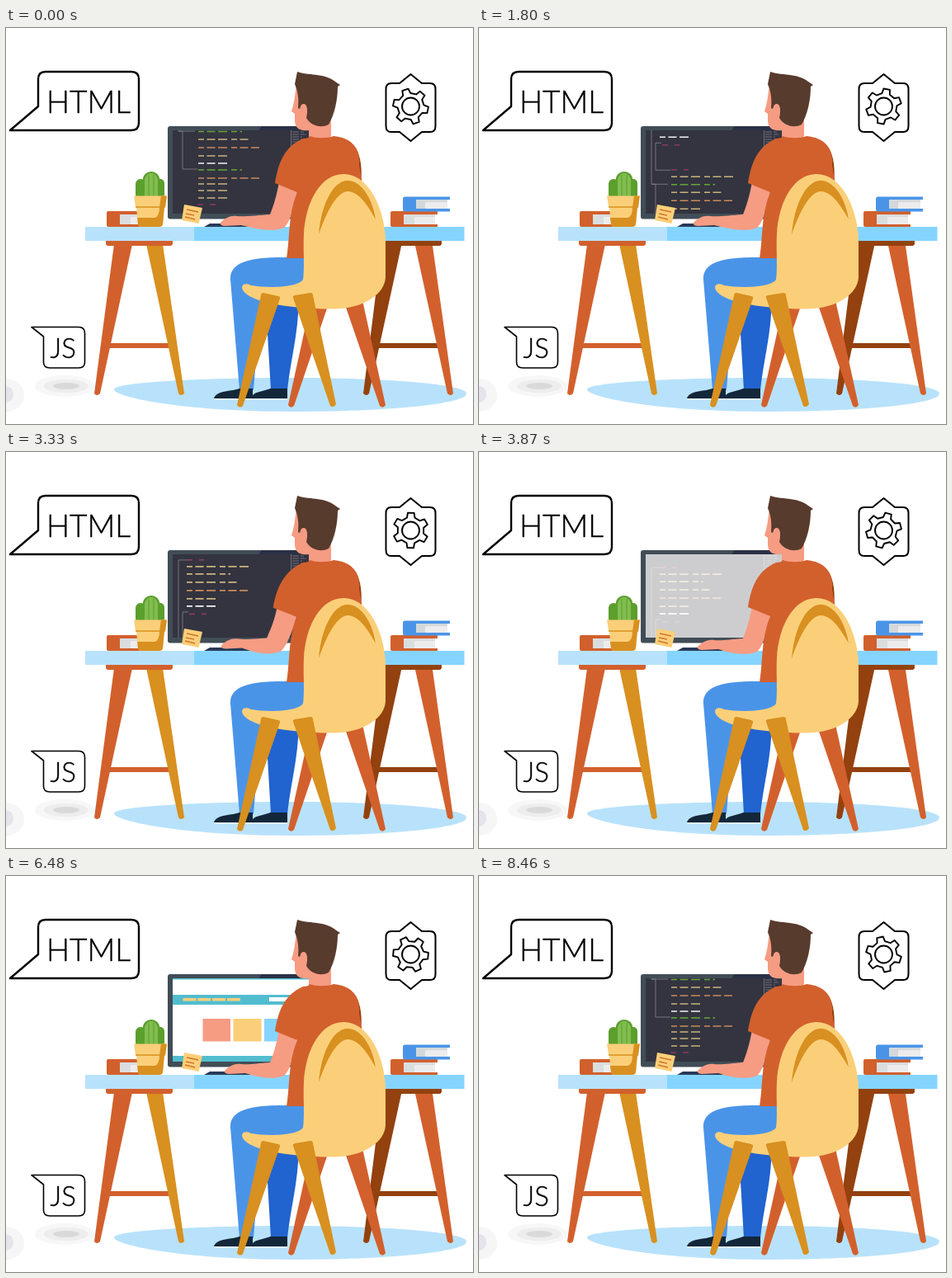
Recreate the animation shown at these times as an HTML page. Size 566 by 480 pixels, loop 8.53 s.

```html
<!DOCTYPE html>
<html lang="en">
<head>
<meta charset="utf-8">
<title>Developer at a desk</title>
<style>
  html, body { margin: 0; width: 100%; height: 100%; overflow: hidden; background: #fff; }
  svg { display: block; width: 100vw; height: 100vh; }
  text { font-family: Lato, "Open Sans", sans-serif; font-weight: 300; stroke: #000; stroke-width: .4; }
  .line { fill: none; stroke: #000; stroke-linejoin: round; }
  .orange { fill: #d2602d; } .rust { fill: #93410f; } .ochre { fill: #d89020; }
  .sand { fill: #fbcf79; } .skin { fill: #f59c83; } .sky { fill: #85d4ff; }
  .pale { fill: #b8e2fb; } .blue { fill: #4a94e8; } .teal { fill: #52bdcf; }
  .page { fill: #ececec; } .shoe { fill: #14273a; }
</style>
</head>
<body>
<svg viewBox="0 0 566 480" xmlns="http://www.w3.org/2000/svg">
  <defs><clipPath id="glass"><rect x="202" y="124" width="168" height="101"/></clipPath></defs>

  <!-- Floor and soft shadows -->
  <path class="pale" d="M131 438C131 430 228 424 345 424S558 432 558 443C558 456 462 465 345 465C220 465 131 448 131 438Z"/>
  <ellipse cx="0" cy="445" rx="22" ry="20" fill="#f6f6f6"/>
  <ellipse cx="0" cy="444" rx="9" ry="10" fill="#e4e4ec"/>
  <ellipse cx="71" cy="434" rx="36" ry="13" fill="#f7f7f7"/>
  <ellipse cx="73" cy="434" rx="27" ry="8" fill="#ededed"/>
  <ellipse cx="73" cy="434" rx="16" ry="4" fill="#d9d9d9"/>

  <!-- Labels -->
  <path class="line" stroke-width="2.4" d="M5 124 39 95V62Q39 53 48 53H152Q161 53 161 62V115Q161 124 152 124Z"/>
  <text x="49" y="102.500" font-size="37.200">HTML</text>
  <path class="line" stroke-width="1.6" d="M31 362.500H88Q95.500 362.500 95.500 370V405Q95.500 412 88 412H53Q45.500 412 45.500 405V374Z"/>
  <text x="53.500" y="400" font-size="33">JS</text>
  <path class="line" stroke-width="2" d="M467 67H477L490.500 56 504 67H514Q520.500 67 520.500 74V119Q520.500 126 514 126H504L490.500 137 477 126H467Q460.500 126 460.500 119V74Q460.500 67 467 67Z"/>
  <g class="line" stroke-width="1.900"><path id="gear"/><circle cx="490.500" cy="95" r="10.500"/></g>

  <!-- Desk -->
  <path class="rust" d="M456 260H480L440 443Q437 447 433 443ZM449 382H524V388H447ZM447 258H528V261Q528 264 525 264H447Z"/>
  <path class="orange" d="M131 262H153L114 443Q110 447 107 443ZM124 382H198V388H123ZM496 264H517L542 443Q539 447 535 443Z"/>
  <path class="ochre" d="M170 262H190L216 443Q212 447 209 443Z"/>
  <path class="orange" d="M121 258H202V261Q202 264 199 264H124Q121 264 121 261Z"/>
  <path class="pale" d="M96 241H228V258H96Z"/>
  <path class="sky" d="M228 241H555.500V258H228Z"/>

  <!-- Books -->
  <g id="book">
    <path class="orange" d="M468 222H523V226H482V238H523V241H468Q466 241 466 239V224Q466 222 468 222Z"/>
    <path class="page" d="M482 226H520V238H482Z"/><path fill="#c9cfd2" d="M482 226H520V229H495V238H482Z" opacity=".5"/>
  </g>
  <path class="blue" d="M483 204.500H538V208H497V219H538V222.500H483Q481 222 481 220V207Q481 205 483 204.500Z"/>
  <path class="page" d="M497 208H535V219H497Z"/><path fill="#b9c6cc" d="M497 208H535V211H508V219H497Z" opacity=".5"/>
  <use href="#book" x="-344"/>

  <!-- Monitor -->
  <rect x="196" y="119" width="178" height="112.500" rx="3" fill="#414d56"/>
  <path d="M310 119H372V124H306Z" fill="#2b3047"/>
  <rect x="202" y="124" width="168" height="101" fill="#333440"/>
  <g clip-path="url(#glass)">
    <g id="code" fill="none" stroke-width="1.600">
      <path stroke="#85858d" stroke-width=".8" d="M219 12H209V125H229M221 75H214V108H232M209 125H214V171H232"/>
    </g>
    <g stroke="#7f8088" stroke-width=".8" fill="none">
      <path d="M345.500 124V146"/>
      <path stroke-dasharray="8 2 5 1" d="M347 126H361M347 129H364M347 132H359M347 135H366M347 138H362M347 141H358"/>
    </g>
    <g id="site">
      <rect id="white" x="202" y="124" width="168" height="101" fill="#fff"/>
      <g id="loader">
        <rect x="245" y="167" width="78" height="14" rx="7" fill="#e5e8ea"/>
        <rect id="bar" x="245" y="167" height="14" rx="7" class="teal"/>
      </g>
      <g id="web">
        <path class="teal" d="M202 122H370V125.500H202ZM202 144H370V156H202ZM202 218H370V276H202Z"/>
        <path d="M214.500 149.700H285" stroke="#fbcf79" stroke-width="3.600" stroke-dasharray="16 1.800"/>
        <path d="M319 147H370V152H319Z" fill="#fff"/>
        <g id="cards">
          <rect class="skin" x="238.500" y="173" width="33.500" height="27.500"/>
          <rect class="sand" x="275.500" y="173" width="34" height="27.500"/>
          <rect class="sky" x="313" y="173" width="34" height="27.500"/>
        </g>
        <path class="sand" d="M219 227H267V270H219ZM209 243V249L204 246Z"/>
        <path d="M279 241.500H324M279 244.500H324M279 247.500H324M279 250.500H320" stroke="#fff" stroke-width="1.400"/>
      </g>
    </g>
  </g>
  <path d="M240 241 247 237H300V241Z" fill="#283a58"/>

  <!-- Cactus and sticky note -->
  <g fill="#5b9f2c">
    <rect x="157" y="183" width="12" height="25" rx="6"/><rect x="182" y="183" width="10" height="25" rx="5"/>
    <rect x="165.500" y="174" width="21" height="34" rx="10.500"/>
  </g>
  <path d="M168 207V184Q170 176 176 176T184 184V207Z" fill="#82bd51"/>
  <path d="M173 178V207M179 178V207" stroke="#5b9f2c" fill="none"/>
  <path class="sand" d="M155 203.500H195L193 217H192L190 238Q189 241 186 241H164Q161 241 160 238L158 217H157Z"/>
  <path class="ochre" d="M188 203.500H195L193 217H192L190 238Q189 241 186 241H164Q161 241 160 238L159 230H180Q186 229 186 217Z"/>
  <path d="M157 217H193" stroke="#d89020" stroke-width="1.500"/>
  <path class="sand" d="M216 214 238 218 233.500 237 213 233Z"/>
  <path d="M219 220 233 223M218 225 228 227M217 229 229 232" stroke="#d2752d" stroke-width="1.400"/>

  <!-- Raised mug -->
  <g id="mug">
    <path class="skin" d="M322 150Q326 143 330 149L336 156 366 190 350 202 330 172Q320 163 322 150Z"/>
    <path d="M311.500 124 333 131 326 160 303 153Z" fill="#f7f7f9" stroke="#f7f7f9" stroke-width="1.500" stroke-linejoin="round"/>
    <path d="M329 130 333 131 326 160 321 158.500Z" fill="#dddde3"/>
    <path class="skin" d="M322 156Q325 147 331 149L336 160 329 168Z"/>
  </g>

  <!-- Legs -->
  <path fill="#2163cf" d="M314 320H355C355 370 346 395 341 439H321Z"/>
  <path class="blue" d="M364 278H335C295 278 271 284 272 305L283 439H300L309 325 364 315Z"/>
  <path class="shoe" d="M252 449C255 439 272 441 283 437H299V449ZM297 449C299 440 312 441 320 437H341V449Z"/>
  <path d="M252 450H299M300 450H341" stroke="#eef4f8" stroke-width="1.600"/>

  <!-- Body -->
  <path class="skin" d="M352 68C350 85 349 92 346 101L350 104V113C351 122 356 125 367 124V132C374 137 389 137 394 131V110L378 68Z"/>
  <path fill="#573b2d" d="M353 53C366 58 385 54 399 65L405 69 402 71C402 88 398 105 391 117C381 122 369 118 364 109 366 101 365 94 361 92 357 92 357 96 356 98L354 97C355 86 354 77 350 68Z"/>
  <ellipse class="skin" cx="361" cy="98" rx="3.800" ry="6"/>
  <path class="rust" d="M424 146Q433 160 430 192L420 180Z"/>
  <path id="arm" class="skin"/>
  <path id="shirt" class="orange"/>

  <!-- Chair -->
  <path class="orange" d="M369 334H391L349 458Q345 462 342 457ZM409 330H432L460 457Q457 462 453 458Z"/>
  <path class="sand" d="M409 177C438 177 458 215 460 255V302C459 322 435 340 397 340.500C350 341 290 333 286 315C286 310 291 309 297 312C320 316 354 314 360 305C362 290 360 265 361 250C363 210 382 177 409 177Z"/>
  <path class="ochre" d="M379 250C382 215 396 185 414 185C432 185 445 210 448 232C437 212 426 198 414 198C400 199 388 225 379 250Z"/>
  <path class="ochre" d="M309 324Q309 321 312 321L330 325Q333 326 332 328L287 458Q283 462 280 457ZM348 327Q347 325 350 324L369 321Q372 321 372 324L400 456Q397 461 393 458Z"/>
</svg>
<script>
const LOOP = 8530, SCROLL = 35.7 / 1000, CODE_END = 3590;
const $ = id => document.getElementById(id);
const ramp = (t, a, b) => Math.min(1, Math.max(0, (t - a) / (b - a)));
const ease = (t, a, b) => { const k = ramp(t, a, b); return k * k * (3 - 2 * k); };
const show = (id, opacity) => $(id).setAttribute('opacity', opacity);
const move = (id, x, y) => $(id).setAttribute('transform', `translate(${x} ${y})`);

// Code lines: y, x, length, colour key
const inks = { g: '#67a536', y: '#c9b47c', o: '#c98a5a', w: '#f4f4f4', p: '#8b3a5e' };
const lines = [
  [12, 219, 21, 'p'], [20, 219, 77, 'y'], [29, 219, 53, 'y'], [39, 219, 64, 'y'],
  [49, 219, 74, 'o'], [59, 219, 40, 'y'], [68, 219, 40, 'w'], [77.5, 222, 21, 'p'],
  [107.5, 233, 21, 'p'], [116, 233, 77, 'y'], [125.5, 233, 53, 'g'], [135, 233, 63, 'y'],
  [145, 233, 74, 'o'], [155, 233, 40, 'y'], [164, 233, 40, 'w'], [172, 233, 53, 'g'],
  [182, 233, 74, 'o'], [189, 233, 40, 'y'], [197, 233, 40, 'y'], [206, 233, 40, 'y'],
  [214, 232, 22, 'p']
];
for (const [y, x, length, ink] of lines) {
  const line = document.createElementNS('http://www.w3.org/2000/svg', 'path');
  line.setAttribute('d', `M${x} ${y}h${length}`);
  line.setAttribute('stroke', inks[ink]);
  line.setAttribute('stroke-dasharray', ink === 'p' ? '7 8' : '7 3.5 10 3.5 11 5');
  $('code').append(line);
}

function gearPath(cx, cy, teeth) {
  const step = 2 * Math.PI / teeth, points = [];
  for (let i = 0; i < teeth; i++) {
    for (const [offset, r] of [[-.29, 16], [-.17, 21.5], [.17, 21.5], [.29, 16]]) {
      const a = (i + offset) * step - Math.PI / 2;
      points.push(`${(cx + r * Math.cos(a)).toFixed(2)} ${(cy + r * Math.sin(a)).toFixed(2)}`);
    }
  }
  return `M${points.join('L')}Z`;
}
$('gear').setAttribute('d', gearPath(490.5, 95, 6));

function drawBody(t) {
  const lean = ease(t, 2000, 2500) - ease(t, 3100, 3500);
  const typing = -5 - 3 * Math.sin(t * 2 * Math.PI / 600);
  const hand = typing * (1 - ease(t, 3500, 3700));
  // Each joint follows the lean by its own amount
  const sleeve = (x, y) => `${x - 6 * lean} ${y + 2 * lean}`;
  const elbow = (x, y) => `${x - 10 * lean} ${y - lean}`;
  const palm = (x, y) => `${x + hand} ${y - 4 * lean}`;
  const cuff = `${353 - 2 * lean} ${199 + 2 * lean}`;
  $('arm').setAttribute('d', `M${sleeve(331, 186)}C${sleeve(328, 204)} ${elbow(324, 216)} ${elbow(320, 226)}
    C${elbow(305, 227)} ${palm(295, 229)} ${palm(285, 228)}C${palm(277, 227)} ${palm(271, 230)} ${palm(265, 236)}
    Q${palm(264, 240)} ${palm(271, 240)}L${palm(290, 239)}C${elbow(308, 245)} ${elbow(326, 247)} ${elbow(337, 242)}
    C${elbow(345, 235)} ${sleeve(351, 212)} ${cuff}Z`);
  $('shirt').setAttribute('d', `M360 134Q367 134 368 131C376 134 389 134 397 131
    C420 133 430 147 428 166L440 240V300H361V279L340 279C344 255 342 225 ${cuff}
    L${sleeve(326, 188)}C${sleeve(330, 164)} 337 144 360 134Z`);

  const raise = ease(t, 2050, 2580) - ease(t, 3100, 3450);
  const sip = ease(t, 2630, 2800) - ease(t, 2980, 3130);
  const away = 1 - raise;
  $('mug').setAttribute('transform',
    `translate(${46 * away + 13 * sip} ${46 * away - 10 * sip}) rotate(${14 * sip} 325 160)`);
  $('mug').setAttribute('visibility', raise > 0 ? 'visible' : 'hidden');
}

function drawScreen(t) {
  move('code', 0, t < 6000 ? SCROLL * Math.min(t, CODE_END) : 0);
  show('site', 1 - ramp(t, 7950, 8400));
  show('white', ramp(t, CODE_END, 3963));
  show('loader', ramp(t, 4150, 4300) * (1 - ramp(t, 5220, 5340)));
  $('bar').setAttribute('width', 78 * ramp(t, 4350, 5220));
  show('web', ramp(t, 5280, 5600));
  [...$('cards').children].forEach((card, i) =>
    card.setAttribute('opacity', ramp(t, 5450 + i * 180, 5650 + i * 180)));
  move('web', 0, -33 * ease(t, 6500, 7540));
}

function render(t) {
  $('gear').setAttribute('transform', `rotate(${-18 - 720 * t / LOOP} 490.5 95)`);
  drawBody(t);
  drawScreen(t);
}

const start = performance.now();
function tick() {
  render((performance.now() - start) % LOOP);
  requestAnimationFrame(tick);
}
render(0);
requestAnimationFrame(tick);
</script>
</body>
</html>
```
